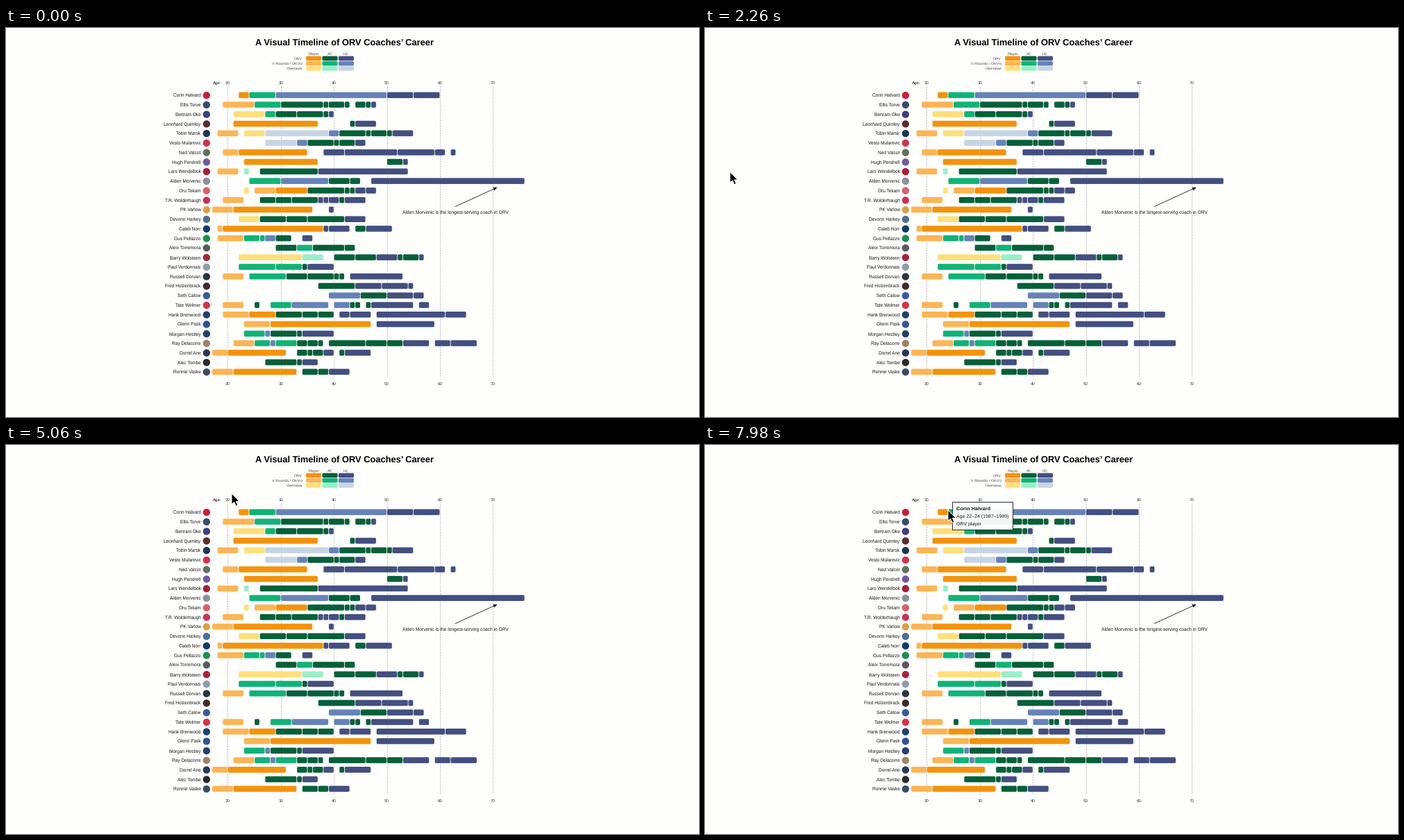
Animation, 998 px wide and 561 px high, one loop 8000 ms. Source, as a matplotlib script:

```python
import matplotlib.pyplot as plt
import numpy as np
from matplotlib.animation import FuncAnimation
from matplotlib.collections import PatchCollection
from matplotlib.patches import Circle, FancyBboxPatch, Polygon, Rectangle
from matplotlib.transforms import Affine2D

W, H, DPI = 998, 561, 100
LOOP, STEP = 8000, 40
PT = 72 / DPI

plt.rcParams.update({
    "font.family": "Liberation Sans",
    "text.hinting": "none",
    "text.kerning_factor": 0,
    "toolbar": "None",
})

# Upper case: top league, lower case: second tier, next letter: overseas
COLORS = {
    "P": "#f3930c", "p": "#fbb555", "q": "#fde07c",
    "A": "#05603a", "a": "#10b377", "b": "#98efc8",
    "H": "#434f80", "h": "#6583b9", "i": "#c6d5e3",
}

# Name, badge colour, ages with the role held between them ("-" is a gap)
COACHES = [
    ("Corin Halvard", "#c8203a", "22 P 24 a 29 h 50 H 55 H 60"),
    ("Ellis Torve", "#3a4a6b", "19 p 25 a 30 A 38 A 39 A 42 A 43 - 44 A 46 A 47 H 48"),
    ("Bertram Oke", "#3f3d7c", "21 q 27 a 29 A 33 A 38 A 39 H 40"),
    ("Leonhard Quimley", "#5a2f33", "21 P 37 - 43 A 44 H 48"),
    ("Tobin Marsk", "#1f3554", "18 p 22 - 23 q 27 i 39 h 41 A 46 A 47 A 50 A 51 H 55"),
    ("Vesto Mularevic", "#d0324b", "27 i 33 h 35 A 40 A 41 A 44 H 46"),
    ("Ned Valcot", "#66705c", "19 p 22 P 35 - 38 H 42 H 52 H 59 H 61 - 62 H 63"),
    ("Hugh Pendrell", "#6f5a9c", "23 P 37 - 50 A 53 H 54"),
    ("Lars Wendelbok", "#a32036", "18 p 22 - 23 b 24 - 26 A 37 H 54"),
    ("Alden Morvenic", "#8a9096", "24 a 30 h 39 A 43 A 45 - 47 H 76"),
    ("Oru Tekam", "#d8606a", "23 q 24 - 25 p 29 P 35 A 42 A 43 A 44 H 46 H 48"),
    ("T.R. Wolderhaugh", "#c8325a", "19 p 23 - 26 A 29 A 32 A 37 H 38 H 39 H 41 A 42 H 46"),
    ("PK Varlow", "#dca044", "17 p 21 P 36 - 39 H 40"),
    ("Devonn Harkey", "#4f6d92", "22 q 26 A 31 A 35 A 42 H 46"),
    ("Caleb Norr", "#123a63", "18 p 19 P 38 H 39 H 43 - 44 A 46 H 51"),
    ("Gus Pellazzo", "#1b8f50", "18 p 23 a 26 a 27 h 29 A 32 - 34 H 36"),
    ("Aleix Torremora", "#5a5a5a", "29 A 33 a 36 A 42 A 44"),
    ("Barry Wolsteen", "#a5243f", "22 q 34 b 38 - 40 A 44 A 48 H 52 A 53 A 56 H 57"),
    ("Paul Verdonnais", "#8f9ca8", "22 a 29 a 34 A 35 H 40"),
    ("Russell Dorvan", "#2e3440", "19 p 23 - 24 a 31 A 35 A 40 A 41 A 42 - 43 H 53"),
    ("Fred Holzenbrack", "#3f2c2a", "37 A 44 H 49 H 54 H 55"),
    ("Seth Calow", "#3a5aa0", "39 h 45 A 50 H 55 H 57"),
    ("Tate Welmer", "#d6324a", "19 p 23 - 25 A 26 - 28 a 32 h 39 - 40 h 43 A 44 A 45 "
                               "- 46 A 47 H 55 - 56 H 58"),
    ("Hank Brenwood", "#24406b", "19 p 24 P 29 A 34 A 37 A 40 - 41 H 43 H 47 - 48 H 61 H 65"),
    ("Glenn Pask", "#2f5496", "23 p 28 P 47 - 48 H 59"),
    ("Morgan Hestley", "#26406b", "23 a 27 h 28 A 33 A 34 H 40"),
    ("Ray Delacorre", "#a08468", "21 p 25 a 28 h 29 a 33 A 35 A 37 A 38 - 39 A 46 A 50 "
                                 "A 53 H 58 - 59 H 62 H 67"),
    ("Dorrel Ane", "#2a3a55", "17 p 20 P 31 - 33 A 35 A 36 A 38 H 40 - 41 A 42 H 47"),
    ("Alec Tombe", "#2a2a2a", "27 A 33 A 34 H 37"),
    ("Ronnie Vaske", "#3a4c63", "17 p 21 P 33 - 34 A 37 A 39 H 43"),
]

fig = plt.figure(figsize=(W / 100, H / 100), dpi=DPI, facecolor="#fefefd")
ax = fig.add_axes([0, 0, 1, 1])
ax.set(xlim=(0, W), ylim=(H, 0))
ax.axis("off")


def age_x(age):
    return 319.5 + (age - 20) * 7.634


def row_y(row):
    return 96.8 + row * 13.76


def label(x, y, text, px, ha="left", color="#151515", **kw):
    """Text whose capitals are centred on y, with its size in pixels."""
    return ax.text(x, y + 0.36 * px, text, fontsize=px * PT, ha=ha,
                   va="baseline", color=color, **kw)


def bar(x0, x1, y, h):
    r = 1.8
    return FancyBboxPatch((x0 + r, y - h / 2 + r), x1 - x0 - 2 * r, h - 2 * r,
                          boxstyle=f"round,pad={r},rounding_size={r}")


def add_all(patches, colors):
    ax.add_collection(PatchCollection(patches, facecolors=colors,
                                      edgecolors="none", zorder=2))


def draw_legend():
    patches, colors = [], []
    columns = [("Player", "Ppq"), ("AC", "Aab"), ("HC", "Hhi")]
    for c, (head, roles) in enumerate(columns):
        x = 432 + 23.4 * c
        label(x + 11, 36.7, head, 5.5, "center", "#444444")
        for r, role in enumerate(roles):
            patches.append(bar(x, x + 22.2, 43.8 + 7.3 * r, 6.6))
            colors.append(COLORS[role])
    add_all(patches, colors)
    for r, tier in enumerate(["ORV", "V Rounds / OKVU", "Overseas"]):
        label(427, 43.8 + 7.3 * r, tier, 5.5, "right", "#444444")


def draw_axis():
    label(298, 78.6, "Age:", 6.1)
    for age in range(20, 71, 10):
        x = age_x(age)
        ax.plot([x, x], [84, 504], color="#b4b4b4", lw=0.8 * PT,
                dashes=(3, 1.6), zorder=1)
        for y in (78.6, 512.8):
            label(x, y, str(age), 6.1, "center", "#333333")


def draw_careers():
    patches, colors = [], []
    for row, (name, badge, career) in enumerate(COACHES):
        y = row_y(row)
        label(280.5, y, name, 6.55, "right")
        patches.append(Circle((288.8, y + 0.3), 5.2))
        colors.append(badge)
        parts = career.split()
        ages = [int(a) for a in parts[::2]]
        for start, role, end in zip(ages, parts[1::2], ages[1:]):
            if role != "-":
                patches.append(bar(age_x(start) + 0.4, age_x(end) - 0.4, y, 8.6))
                colors.append(COLORS[role])
    add_all(patches, colors)


def draw_note():
    label(571, 265.3, "Alden Morvenic is the longest-serving coach in ORV", 6.6)
    ax.annotate("", xy=(707.5, 229.8), xytext=(647, 257.5),
                arrowprops=dict(arrowstyle="-|>,head_length=0.22,head_width=0.1",
                                color="#151515", lw=0.8 * PT,
                                shrinkA=0, shrinkB=0, mutation_scale=14))


label(487, 20, "A Visual Timeline of ORV Coaches\u2019 Career", 12.92, "center",
      "black", weight="bold")
draw_legend()
draw_axis()
draw_careers()
draw_note()

# Pointer and tooltip share one movable frame with the pointer tip at (0, 0)
shift = Affine2D()
moving = shift + ax.transData

tooltip = [
    ax.add_patch(Rectangle((6, -12), 87, 40, fc=(1, 1, 1, 0.95), ec="#2f3b3b",
                           lw=1.1 * PT, zorder=5, transform=moving)),
    label(12, -2.8, COACHES[0][0], 7.5, weight="bold", zorder=6, transform=moving),
    label(12, 8.4, "Age 22\u201324 (1987\u20131989)", 7.05, zorder=6, transform=moving),
    label(12, 18.9, "ORV player", 7.05, zorder=6, transform=moving),
]

ARROW = [(0, 0), (0, 15.6), (3.6, 12.3), (6.2, 18), (8.8, 16.9),
         (6.3, 11.3), (11.2, 11.2)]
ax.add_patch(Polygon(ARROW, fc="black", ec="white", lw=0.9 * PT,
                     zorder=7, transform=moving))

# Pointer path: time in ms, x, y
PATH = np.array([
    (0, -30, 240), (2000, -30, 240), (2400, 80, 186), (2960, 229, 110),
    (3240, 243, 106), (3500, 265, 98), (4080, 310, 86.5), (4500, 319, 77),
    (4920, 325, 70), (5300, 325, 70), (6100, 348, 71), (7300, 348, 71),
    (7820, 350, 94), (8000, 350, 94),
])


def update(i):
    t = i * STEP
    x = np.interp(t, PATH[:, 0], PATH[:, 1])
    y = np.interp(t, PATH[:, 0], PATH[:, 2])
    shift.clear().translate(x, y)
    on_bar = age_x(22) <= x <= age_x(24) and abs(y - row_y(0)) < 4.3
    for part in tooltip:
        part.set_visible(bool(on_bar))
    return tooltip


anim = FuncAnimation(fig, update, frames=LOOP // STEP, interval=STEP,
                     repeat=True, repeat_delay=0, blit=False)
plt.show()
```
